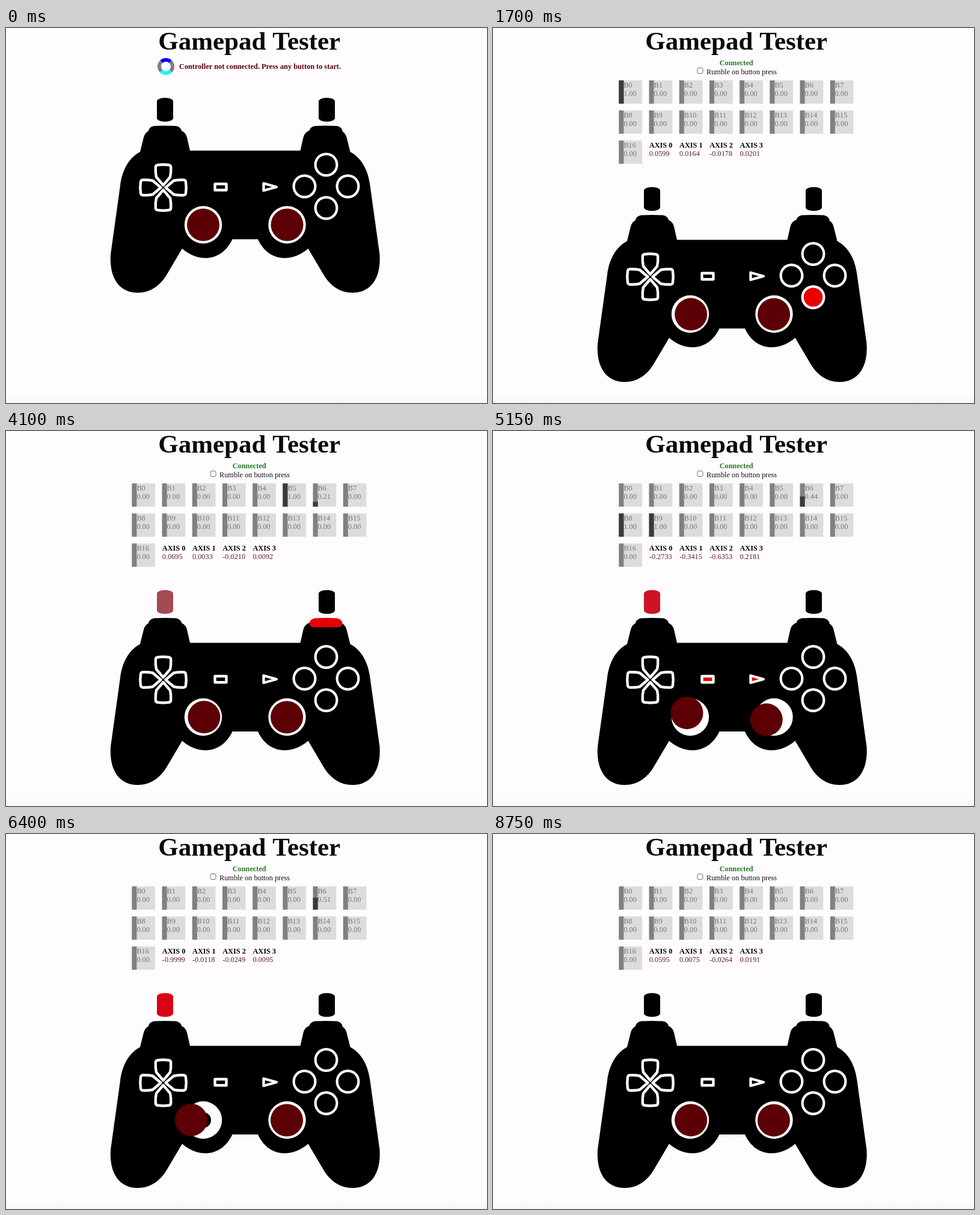
These frames come from a looping animation (800x624 px, 8.8 s). An HTML page with a canvas:

```html
<!DOCTYPE html>
<html lang="en">
<head>
<meta charset="utf-8">
<title>Gamepad Tester</title>
<style>
html, body { margin: 0; width: 100%; height: 100%; overflow: hidden; background: #fefcff; }
canvas { display: block; }
</style>
</head>
<body>
<canvas id="stage" width="800" height="624"></canvas>
<script>
const ctx = document.getElementById('stage').getContext('2d');
const LOOP = 8800, STEP = 50, CONNECT = 1550, IDLE = 7200, TURN = 2 * Math.PI;
const SERIF = '"Liberation Serif", "Times New Roman", serif';
const RED = '#eb0000', MAROON = '#5c0005', PAPER = '#fefcff';

const BODY = new Path2D('M306 204L301 182Q299 174 292 171H238Q231 174 229 182L223 206C203 217 193 238 190 262' +
  'L174 377C171.5 418 190 440.5 219 440.5C240 440.5 256 429 267 411L293 367C320 391 359 389 376.5 351.5' +
  'H419C436 389 475 391 502.5 367L528.5 411C539.5 429 555.5 440.5 576.5 440.5C605.5 440.5 624 418 621.5 377' +
  'L605.5 262C602.5 238 592.5 217 572.5 206L566.5 182Q564.5 174 557.5 171H503.5Q496.5 174 494.5 182L489.5 204Z');
const BUMPER = new Path2D('M237 171Q238 165 246 163Q264.5 162 283 163Q291 165 292 171Q292 177 285 178H244Q237 177 237 171Z');
const TRIGGER = new Path2D('M251 121.5C253 114.5 276 114.5 278 121.5V150.5C276 157.5 253 157.5 251 150.5Z');
const PAD = new Path2D('M-12.7-34Q-12.5-37-9.5-37.5Q0-39 9.5-37.5Q12.5-37 12.7-34Q13.2-25 11.5-17.5L0-4L-11.5-17.5Q-13.2-25-12.7-34Z');
const SELECT = new Path2D('M347.5 259.5H366.5V269.7H347.5Z');
const START = new Path2D('M428.5 258.5L450 264.5L428.5 270.5Z');

// Runs of button taps: first and last button, start, spacing, hold
const TAPS = [
  { from: 0, to: 3, at: 1550, gap: 300, hold: 300 },
  { from: 4, to: 5, at: 3550, gap: 350, hold: 350 },
  { from: 8, to: 9, at: 4950, gap: 150, hold: 300 },
  { from: 16, to: 16, at: 5500, gap: 0, hold: 150 },
  { from: 12, to: 15, at: 6600, gap: 150, hold: 150 }
];

// Stick sweeps: start, end, first angle, turns
const REST = [[.0595, .0075], [-.0264, .0191]];
const SWEEPS = [
  [[2200, 2750, -1.6, 1], [5057, 5400, -3.148, .5], [5600, 6600, 4.41, -1.5]],
  [[2804, 3500, -1.582, 1], [5017, 5400, 1.724, .5], [5700, 6250, 3.1, -1]]
];

function stickAt(side, t) {
  const wobble = t < IDLE ? .01 : 0;
  let pos = REST[side].map((v, i) => v + wobble * Math.sin(t / 90 + 2 * i + side));
  for (const [start, end, angle, turns] of SWEEPS[side]) {
    const reach = Math.max(0, Math.min(1, (t - start) / 200, (end - t) / 200));
    const a = angle + turns * TURN * (t - start) / (end - start);
    pos = [Math.cos(a), Math.sin(a)].map((v, i) => pos[i] + (v - pos[i]) * reach);
  }
  return pos;
}

function buttonsAt(t) {
  const values = Array(17).fill(0);
  for (const { from, to, at, gap, hold } of TAPS) {
    for (let id = from; id <= to; id++) {
      const age = t - at - (id - from) * gap;
      if (age >= 0 && age < hold) values[id] = 1;
    }
  }
  if (t > 3660 && t < 6600) values[6] = .54 * (1 - Math.exp((3660 - t) / 900));
  if (t > 4300 && t < 4800) values[7] = Math.sin((t - 4300) / 500 * Math.PI);
  return values;
}

function text(str, x, y, color, bold = false, size = 12.3, align = 'left') {
  ctx.font = (bold ? 'bold ' : '') + size + 'px ' + SERIF;
  ctx.textAlign = align;
  ctx.fillStyle = color;
  ctx.fillText(str, x, y);
}

function box(x, y, w, h, color) {
  ctx.fillStyle = color;
  ctx.fillRect(x, y, w, h);
}

function disc(x, y, r, color) {
  ctx.beginPath();
  ctx.arc(x, y, r, 0, TURN);
  ctx.fillStyle = color;
  ctx.fill();
}

function fillAt(path, color, dx = 0) {
  ctx.save();
  ctx.translate(dx, 0);
  ctx.fillStyle = color;
  ctx.fill(path);
  ctx.restore();
}

function outlined(path, pressed) {
  ctx.lineWidth = 4.4;
  ctx.lineJoin = 'round';
  ctx.strokeStyle = '#fff';
  ctx.fillStyle = pressed ? RED : '#000';
  ctx.fill(path);
  ctx.stroke(path);
}

function triggerColor(v) {
  if (v <= 0) return '#000';
  const p = Math.max(0, Math.min(1, (v - .21) / .3));
  const mix = (a, b) => Math.round(a + (b - a) * p);
  return `rgb(${mix(164, 218)},${mix(74, 3)},${mix(84, 21)})`;
}

function drawSpinner(t) {
  ['blue', '#808080', 'cyan', '#808080'].forEach((color, i) => {
    const a = t / 2000 * TURN + (i * 2 - 3) * Math.PI / 4;
    ctx.beginPath();
    ctx.arc(266, 64, 11, a, a + Math.PI / 2);
    ctx.lineWidth = 6;
    ctx.strokeStyle = color;
    ctx.stroke();
  });
}

function drawPanel(values, axes) {
  text('Connected', 404.7, 61.5, '#267a26', true, 12.3, 'center');
  ctx.beginPath();
  ctx.roundRect(340, 66.5, 9, 9, 2);
  ctx.lineWidth = 1;
  ctx.strokeStyle = '#707070';
  ctx.stroke();
  text('Rumble on button press', 355, 76.5, '#111');

  values.forEach((v, i) => {
    const x = 209.4 + (i % 8) * 50.2, y = 87.2 + Math.floor(i / 8) * 50;
    box(x, y, 38.7, 38.7, '#dcdcdc');
    box(x, y, 8, 38.7, '#808080');
    box(x, y + 38.7 * (1 - v), 8, 38.7 * v, '#3a3a3a');
    text('B' + i, x + 8, y + 11.6, '#777');
    text(v.toFixed(2), x + 8, y + 25.6, '#777');
  });
  axes.forEach((v, i) => {
    const x = 259.8 + i * 50.2;
    text('AXIS ' + i, x, 199, '#000', true);
    text(v.toFixed(4), x, 213, '#641c25');
  });
}

function drawStick(x, y, [dx, dy]) {
  disc(x, y, 31.2, '#fff');
  disc(x, y, 13, '#000');
  disc(x + dx * 20, y + dy * 20, 27, MAROON);
}

function drawPad(values, left, right) {
  fillAt(BODY, '#000');
  fillAt(TRIGGER, triggerColor(values[6]));
  fillAt(TRIGGER, triggerColor(values[7]), 269);
  fillAt(BUMPER, values[4] ? RED : '#000');
  fillAt(BUMPER, values[5] ? RED : '#000', 267.5);

  [12, 15, 13, 14].forEach((id, i) => {
    ctx.save();
    ctx.translate(261.5, 265.5);
    ctx.rotate(i * Math.PI / 2);
    outlined(PAD, values[id]);
    ctx.restore();
  });
  outlined(SELECT, values[8]);
  outlined(START, values[9]);

  [[0, 1], [1, 0], [-1, 0], [0, -1]].forEach(([dx, dy], id) => {
    const x = 532.5 + dx * 36, y = 263.5 + dy * 36;
    disc(x, y, 20, '#fff');
    disc(x, y, 15.8, values[id] ? RED : '#000');
  });
  drawStick(328, 327.5, left);
  drawStick(467.5, 327.5, right);
}

function draw(t) {
  box(0, 0, 800, 624, PAPER);
  const shade = ctx.createLinearGradient(0, 606, 0, 624);
  shade.addColorStop(0, PAPER);
  shade.addColorStop(1, '#f8f7f9');
  box(0, 606, 800, 18, shade);
  text('Gamepad Tester', 404.7, 35.5, '#0a0a0a', true, 43, 'center');

  const values = buttonsAt(t);
  if (t < CONNECT) {
    drawSpinner(t);
    text('Controller not connected. Press any button to start.', 288, 68, MAROON, true);
    drawPad(values, [0, 0], [0, 0]);
    return;
  }
  const left = stickAt(0, t), right = stickAt(1, t);
  drawPanel(values, [...left, ...right]);
  ctx.save();
  ctx.translate(0, 148.5);
  drawPad(values, left, right);
  ctx.restore();
}

const begin = performance.now();
function tick() {
  const t = (performance.now() - begin) % LOOP;
  draw(Math.floor(t / STEP) * STEP);
  requestAnimationFrame(tick);
}
tick();
</script>
</body>
</html>
```
